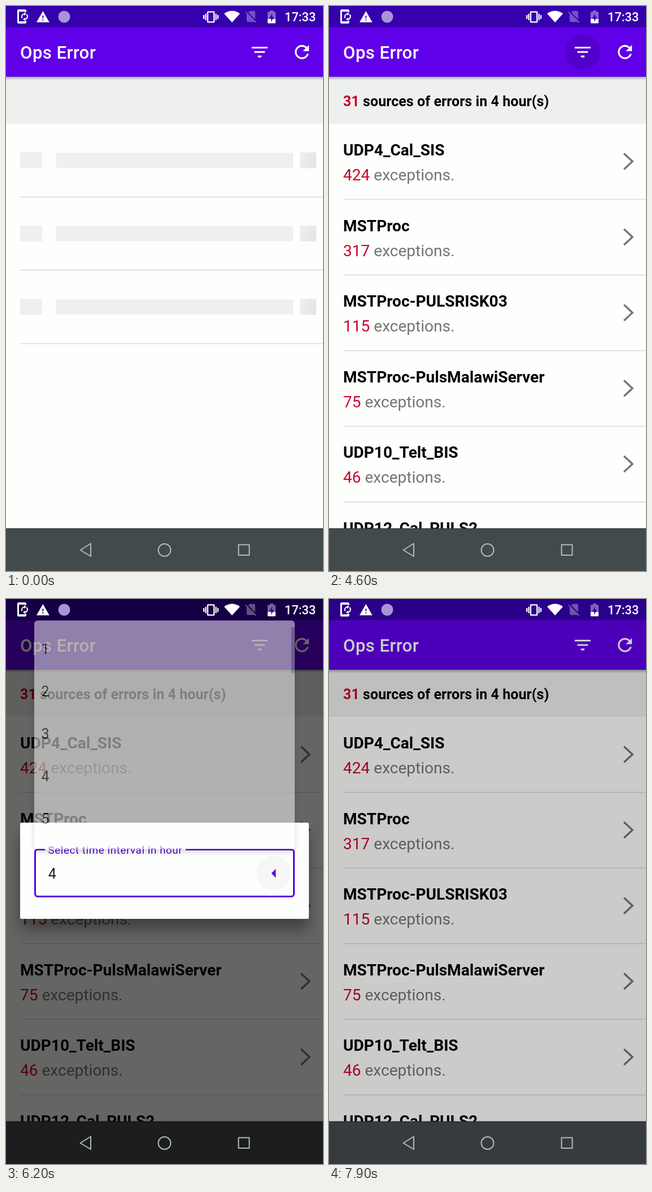
An HTML page for the animation above (8 s loop, 561 px wide and 998 px high).

```html
<!DOCTYPE html>
<html lang="en">
<head>
<meta charset="utf-8">
<title>Ops Error</title>
<style>
  html, body { margin: 0; width: 100%; height: 100%; overflow: hidden; background: #fdfffc; }
  svg { display: block; width: 561px; height: 998px; }
  text { font-family: Roboto, "Noto Sans", sans-serif; font-size: 24.93px; }
  .count { fill: #c8032b; }
  .name { font-size: 28.05px; font-weight: 700; }
  .sub { font-size: 28.05px; fill: #757575; }
  .head { font-size: 25px; font-weight: 700; letter-spacing: .05px; }
  .bar { font-size: 31.16px; font-weight: 500; letter-spacing: .0125em; fill: #fff; }
  .clock { font-size: 21.8px; font-weight: 500; fill: #fff; }
  .label { font-size: 18.7px; letter-spacing: .0333em; fill: #5a02dc; }
  .item { fill: #1c1c1c; }
  .line { fill: #dcdedb; }
  .block { fill: #eef0ed; }
  .nav { fill: none; stroke: #b4b8b8; stroke-width: 2; stroke-linejoin: round; }

  /* Every state is held on a 100 ms grid of the 8 s loop. */
  .skeleton, .list, .dim, .dialog, .popup, .tap, .press, .arrow {
    animation: 8s step-end infinite;
    transform-box: fill-box; transform-origin: center;
  }
  .skeleton { animation-name: skeleton; }
  .list { animation-name: list; }
  .dim { animation-name: dim; }
  .dialog { animation-name: dialog; }
  .popup { animation-name: popup; }
  .tap { animation-name: tap; }
  .press { animation-name: press; }
  .arrow { animation-name: arrow; }
  .shine { animation: shine 1s steps(10, end) -.9s infinite; }

  @keyframes shine { from { transform: translateX(-240px); } to { transform: translateX(601px); } }
  @keyframes skeleton { 0% { opacity: 1; } 13.75%, 100% { opacity: 0; } }
  @keyframes list { 0% { opacity: 0; } 13.75%, 100% { opacity: 1; } }
  @keyframes tap {
    0% { opacity: 0; transform: scale(.5); }
    53.75% { opacity: .06; transform: scale(.7); }
    55% { opacity: .12; transform: none; }
    58.75% { opacity: .08; transform: none; }
    60% { opacity: .03; transform: none; }
    61.25%, 100% { opacity: 0; }
  }
  @keyframes dim {
    0% { opacity: 0; }
    58.75% { opacity: .2; }
    60% { opacity: .4; }
    61.25% { opacity: .6; }
    97.5% { opacity: .4; }
    98.75%, 100% { opacity: .2; }
  }
  @keyframes dialog {
    0% { opacity: 0; }
    58.75% { opacity: .5; transform: scale(.96); }
    60% { opacity: 1; transform: none; }
    97.5% { opacity: .3; transform: none; }
    98.75%, 100% { opacity: 0; }
  }
  @keyframes press {
    0% { opacity: 0; }
    75% { opacity: 1; }
    77.5% { opacity: .6; }
    78.75%, 100% { opacity: 0; }
  }
  @keyframes popup {
    0% { opacity: 0; }
    77.5% { opacity: .5; }
    78.75% { opacity: 1; }
    92.5%, 100% { opacity: 0; }
  }
  @keyframes arrow {
    0% { transform: none; }
    77.5% { transform: rotate(90deg); }
    78.75% { transform: translateY(-1px) rotate(180deg); }
    92.5%, 100% { transform: none; }
  }
</style>
</head>
<body>
<svg viewBox="0 0 561 998">
  <defs>
    <linearGradient id="band">
      <stop offset="0" stop-color="#878787" stop-opacity="0"/>
      <stop offset=".45" stop-color="#878787" stop-opacity=".38"/>
      <stop offset=".55" stop-color="#878787" stop-opacity=".38"/>
      <stop offset="1" stop-color="#878787" stop-opacity="0"/>
    </linearGradient>
    <linearGradient id="drop" x2="0" y2="1">
      <stop offset="0" stop-opacity=".28"/>
      <stop offset="1" stop-opacity="0"/>
    </linearGradient>
    <clipPath id="blocks"><path d="M25 258.5h39v28h-39zM89 259.5h419v26.500h-419zM520.500 258.5h28.500v28h-28.500z"/></clipPath>
    <filter id="deep" x="-20%" y="-40%" width="140%" height="200%">
      <feDropShadow dx="0" dy="19" stdDeviation="12" flood-opacity=".36"/>
    </filter>
    <filter id="soft" x="-10%" y="-10%" width="120%" height="120%">
      <feDropShadow dx="0" dy="5" stdDeviation="5" flood-opacity=".3"/>
    </filter>
  </defs>

  <rect width="561" height="998" fill="#fdfffc"/>
  <rect class="block" y="125" width="561" height="83"/>
  <g class="skeleton" id="skeleton"></g>
  <g class="list">
    <text class="head" x="25" y="176.500"><tspan class="count">31</tspan> sources of errors in 4 hour(s)</text>
    <g id="rows"></g>
  </g>

  <rect y="125" width="561" height="6" fill="url(#drop)"/>
  <rect width="561" height="38" fill="#3600ae"/>
  <rect y="37.500" width="561" height="87.500" fill="#5f00e8"/>
  <text class="bar" x="25" y="93">Ops Error</text>
  <circle class="tap" cx="448.900" cy="81.300" r="31"/>
  <g fill="#fff">
    <path transform="translate(430.2 62.600) scale(1.558)" d="M10 18h4v-2h-4v2zM3 6v2h18V6H3zm3 7h12v-2H6v2z"/>
    <path transform="translate(505 62.600) scale(1.558)" d="M17.650 6.350C16.200 4.900 14.210 4 12 4c-4.420 0-7.990 3.580-7.990 8s3.570 8 7.990 8c3.730 0 6.840-2.550 7.730-6h-2.080c-.82 2.330-3.040 4-5.650 4-3.310 0-6-2.690-6-6s2.690-6 6-6c1.660 0 3.140.69 4.220 1.780L13 11h7V4l-2.350 2.350z"/>
  </g>
  <rect y="923" width="561" height="75" fill="#434a4c"/>
  <rect y="922.500" width="561" height="1.500" fill="#303637"/>

  <rect class="dim" width="561" height="998"/>

  <g class="dialog">
    <rect x="25" y="395" width="511" height="170" rx="3" fill="#fdfffc" filter="url(#deep)"/>
    <path d="M69 442.500H56a4.500 4.500 0 0 0-4.500 4.500V521a4.500 4.500 0 0 0 4.500 4.500H505a4.500 4.500 0 0 0 4.500-4.500V447a4.500 4.500 0 0 0-4.500-4.500H318" fill="none" stroke="#5a02dc" stroke-width="3"/>
    <text class="label" x="74.500" y="449.500">Select time interval in hour</text>
    <text class="item" x="74.800" y="494">4</text>
    <circle class="press" cx="473.500" cy="484" r="30.500" fill="#f2f1f2"/>
    <path class="arrow" d="M465.700 480.700h15.600l-7.800 7.800z" fill="#5a02dc"/>
  </g>

  <g class="popup">
    <rect x="50" y="38" width="461" height="404" rx="6" fill="#fdfffc" filter="url(#soft)"/>
    <rect x="505" y="50" width="6" height="80.500" fill="#b9bab8"/>
    <g id="items"></g>
  </g>

  <g fill="#fff">
    <path fill-rule="evenodd" d="M22.500 6h11a2.500 2.500 0 0 1 2.500 2.500V11h-2.500v-1H23v17h10.500v-1H36v2.500a2.500 2.500 0 0 1-2.500 2.500h-11a2.500 2.500 0 0 1-2.500-2.500v-20A2.500 2.500 0 0 1 22.500 6z"/>
    <path d="M28.500 21.500a5 5 0 0 1 4-7.500M36.500 15a5 5 0 0 1-3.500 8.500" fill="none" stroke="#fff" stroke-width="2"/>
    <path d="M32 11l4 3-4 3zM34 20.500l-4 3 4 3z"/>
    <path transform="translate(53 7) scale(1.03)" d="M1 21h22L12 2 1 21zm12-3h-2v-2h2v2zm0-4h-2v-4h2v4z"/>
    <circle cx="103" cy="19" r="10.500" fill="#a895d8"/>
    <path transform="translate(349 5.800) scale(1.130)" d="M0 15h2V9H0v6zm3 2h2V7H3v10zm19-8v6h2V9h-2zm-3 8h2V7h-2v10zM16.500 3h-9C6.670 3 6 3.670 6 4.500v15c0 .83.67 1.500 1.500 1.500h9c.83 0 1.500-.67 1.500-1.500v-15c0-.83-.67-1.500-1.500-1.500zM16 19H8V5h8v14z"/>
    <path d="M386 13.500Q400 3.500 414 13.500L400 29z"/>
    <path opacity=".32" transform="translate(420.500 5.500) scale(1.080)" d="M18.990 5c0-1.100-.89-2-1.990-2h-7L7.660 5.340 19 16.680 18.990 5zM3.650 3.880L2.380 5.150 5 7.770V19c0 1.100.9 2 2 2h10.010c.35 0 .67-.1.960-.26l1.880 1.880 1.270-1.270L3.650 3.880z"/>
    <path opacity=".4" d="M463 10.500h4V8h6v2.500h4V23H463z"/>
    <path d="M463 23h14v6.500a1 1 0 0 1-1 1h-12a1 1 0 0 1-1-1z"/>
    <path d="M471 13l-5 9h3.300v6l5-9h-3.300z" fill="#3600ae"/>
    <text class="clock" x="493" y="27.300">17:33</text>
  </g>
  <g class="nav">
    <path d="M131.500 961L150 949.500v22.500z"/>
    <circle cx="280.500" cy="961" r="11"/>
    <rect x="411.500" y="951.500" width="19" height="18.500"/>
  </g>
</svg>
<script>
  const fill = (id, data, draw) => {
    document.getElementById(id).innerHTML = data.map(draw).join('');
  };
  const divider = y => `<rect class="line" x="25" y="${y}" width="536" height="1.700"/>`;

  fill('skeleton', [0, 1, 2], i => `
    <g transform="translate(0 ${i * 129.4})">
      <g clip-path="url(#blocks)">
        <rect class="block" y="250" width="561" height="45"/>
        <g transform="translate(0 273) skewX(-20)">
          <rect class="shine" y="-20" width="280" height="40" fill="url(#band)"/>
        </g>
      </g>
      ${divider(336.5)}
    </g>`);

  const sources = [
    ['UDP4_Cal_SIS', 424],
    ['MSTProc', 317],
    ['MSTProc-PULSRISK03', 115],
    ['MSTProc-PulsMalawiServer', 75],
    ['UDP10_Telt_BIS', 46],
    ['UDP12_Cal_PULS2', 40]
  ];
  fill('rows', sources, ([name, count], i) => `
    <g transform="translate(0 ${i * 133.6})">
      <text class="name" x="25" y="264">${name}</text>
      <text class="sub" x="25" y="308"><tspan class="count">${count}</tspan> exceptions.</text>
      <path d="M522 260.500l15 14-15 14" fill="none" stroke="#757575" stroke-width="3.400"/>
      ${divider(340.7)}
    </g>`);

  fill('items', [1, 2, 3, 4, 5], (n, i) =>
    `<text class="item" x="62.500" y="${97 + i * 74.9}">${n}</text>`);
</script>
</body>
</html>
```
